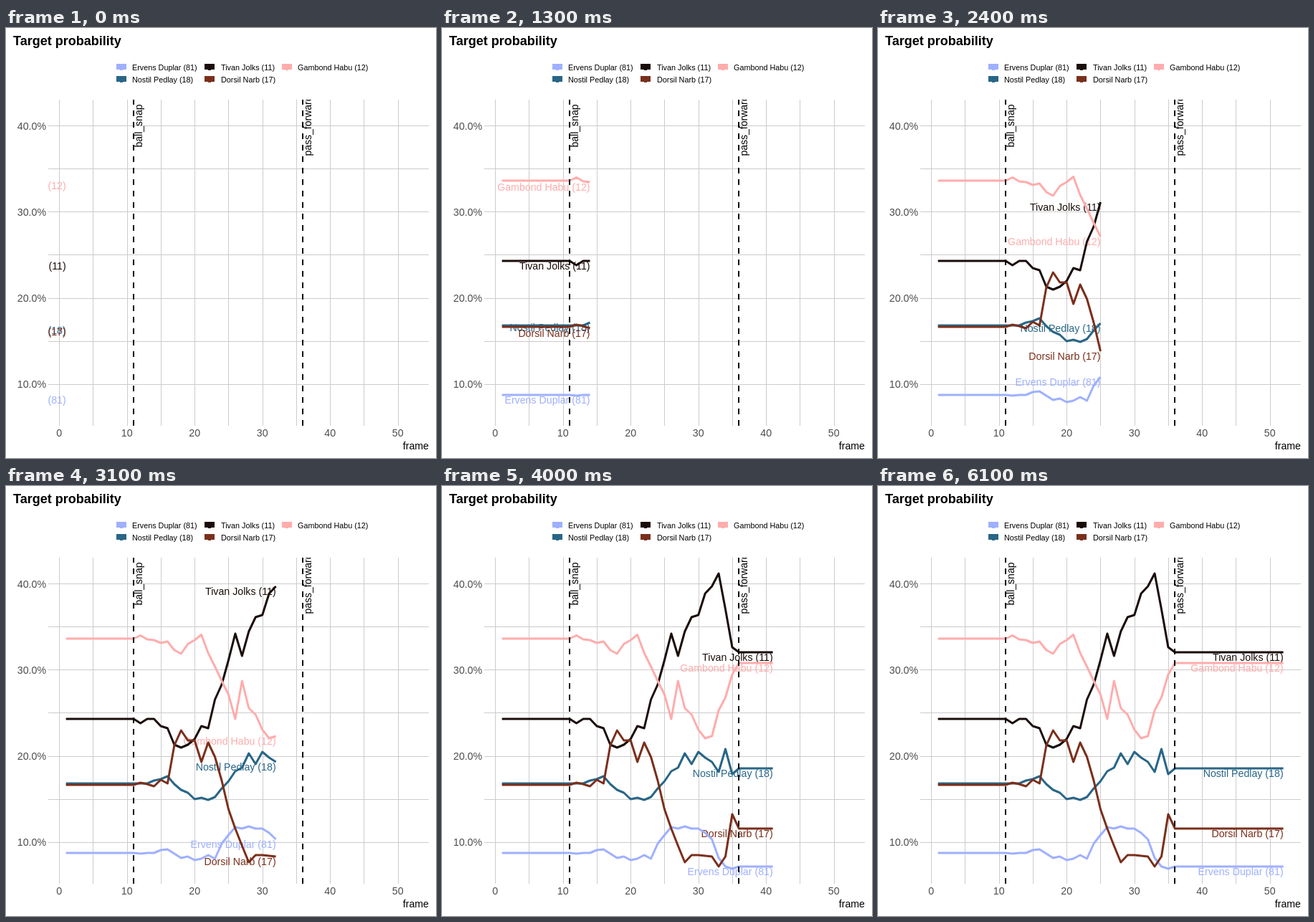
These frames come from a looping animation (600x600 px, 6200 ms). An HTML page with a canvas:

```html
<!DOCTYPE html>
<html lang="en">
<head>
<meta charset="utf-8">
<title>Target probability</title>
<style>
  html, body { margin: 0; width: 100%; height: 100%; overflow: hidden; background: #fff; }
  canvas { display: block; }
</style>
</head>
<body>
<canvas id="chart" width="600" height="600"></canvas>
<script>
const ctx = document.getElementById('chart').getContext('2d');

const LOOP = 6200, STEP = 100;
const SNAP = 11, PASS = 36, LAST = 52;
const PANEL = { left: 59, top: 100, right: 590, bottom: 555 };
const SANS = '"Liberation Sans", Arial, sans-serif';

// Each series is flat up to the snap and after the pass; ys holds the heights in between.
const players = [
  { name: 'Ervens Duplar (81)', color: '#9EB0FF', key: [154, 176, 0],
    ys: [512, 513, 512, 512, 508, 507, 513, 519, 517, 522, 520, 515, 520,
         499, 487, 476, 478, 475, 478, 478, 484, 493, 519, 531, 534, 531] },
  { name: 'Nostil Pedlay (18)', color: '#286687', key: [154, 176, 1],
    ys: [415, 415, 415, 411, 409, 405, 416, 424, 428, 437, 435, 438, 434,
         422, 412, 398, 393, 373, 388, 371, 379, 385, 399, 367, 402, 394] },
  { name: 'Tivan Jolks (11)', color: '#190C09', key: [277, 300, 0],
    ys: [325, 331, 325, 325, 335, 338, 361, 365, 361, 353, 335, 338, 298,
         277, 243, 206, 237, 203, 183, 180, 150, 140, 122, 172, 225, 232] },
  { name: 'Dorsil Narb (17)', color: '#7A2F1B', key: [277, 300, 1],
    ys: [417, 414, 416, 419, 410, 415, 362, 341, 355, 355, 385, 358, 378,
         411, 451, 478, 502, 525, 515, 515, 516, 517, 531, 517, 458, 478] },
  { name: 'Gambond Habu (12)', color: '#FFACAC', key: [385, 407, 0],
    ys: [213, 208.5, 214, 215, 219, 217, 229, 234, 220.5, 215, 207.5, 233, 252,
         272, 291, 325, 272, 310, 319, 340, 352, 349, 313, 295, 263, 247] }
];

const xOf = frame => 74.2 + 9.45 * frame;
const yOf = percent => 136.5 + 12.03 * (40 - percent);
const heightAt = (player, frame) =>
  player.ys[Math.min(Math.max(frame, SNAP), PASS) - SNAP];

function text(str, x, y, size, color = '#000', align = 'left', weight = '') {
  ctx.font = `${weight} ${size}px ${SANS}`;
  ctx.fillStyle = color;
  ctx.textAlign = align;
  ctx.fillText(str, x, y);
}

function drawGrid() {
  ctx.fillStyle = '#ccc';
  for (let f = 0; f <= 50; f += 5)
    ctx.fillRect(Math.round(xOf(f)), PANEL.top, 1, PANEL.bottom - PANEL.top);
  for (let p = 10; p <= 40; p += 5)
    ctx.fillRect(PANEL.left, Math.floor(yOf(p)), PANEL.right - PANEL.left, 1);
}

function drawAxes() {
  for (let p = 10; p <= 40; p += 10)
    text(p.toFixed(1) + '%', 56, Math.round(yOf(p)) + 5, 14.2, '#4d4d4d', 'right');
  for (let f = 0; f <= 50; f += 10)
    text(f, xOf(f), 570, 14.2, '#4d4d4d', 'center');
  text('frame', 590, 588, 14.2, '#000', 'right');
}

function drawLegend() {
  for (const { name, color, key: [keyX, textX, row] } of players) {
    const y = 50 + 17 * row;
    ctx.fillStyle = color;
    ctx.fillRect(keyX, y, 14, 8);
    ctx.fillRect(keyX + 5, y + 8, 4, 1);
    text(name, textX, y + 9, 10.8);
  }
}

function drawSeries(player, frame) {
  ctx.beginPath();
  for (let f = 1; f <= frame; f++) ctx.lineTo(xOf(f), heightAt(player, f));
  ctx.strokeStyle = player.color;
  ctx.lineWidth = 3;
  ctx.lineJoin = 'round';
  ctx.stroke();
}

function drawEvent(label, frame) {
  const x = Math.round(xOf(frame));
  ctx.beginPath();
  ctx.moveTo(x, PANEL.bottom);
  ctx.lineTo(x, PANEL.top);
  ctx.strokeStyle = '#000';
  ctx.lineWidth = 2;
  ctx.setLineDash([8, 8]);
  ctx.stroke();
  ctx.setLineDash([]);

  ctx.save();
  ctx.translate(x + 12, yOf(40));
  ctx.rotate(-Math.PI / 2);
  text(label, 0, 0, 14, '#000', 'center');
  ctx.restore();
}

function draw(time) {
  const frame = Math.min(LAST, Math.floor((time % LOOP) / STEP) + 1);

  ctx.fillStyle = '#fff';
  ctx.fillRect(0, 0, 600, 600);
  text('Target probability', 10, 24, 18, '#000', 'left', 'bold');
  drawLegend();
  drawGrid();
  drawAxes();

  ctx.save();
  ctx.beginPath();
  ctx.rect(PANEL.left - 1, PANEL.top, PANEL.right - PANEL.left + 1, PANEL.bottom - PANEL.top);
  ctx.clip();
  for (const p of players)
    text(p.name, xOf(frame), heightAt(p, frame) + 12, 14.2, p.color, 'right');
  for (const p of players) drawSeries(p, frame);
  drawEvent('ball_snap', SNAP);
  drawEvent('pass_forward', PASS);
  ctx.restore();
}

function tick() {
  draw(performance.now());
  requestAnimationFrame(tick);
}
tick();
</script>
</body>
</html>
```
